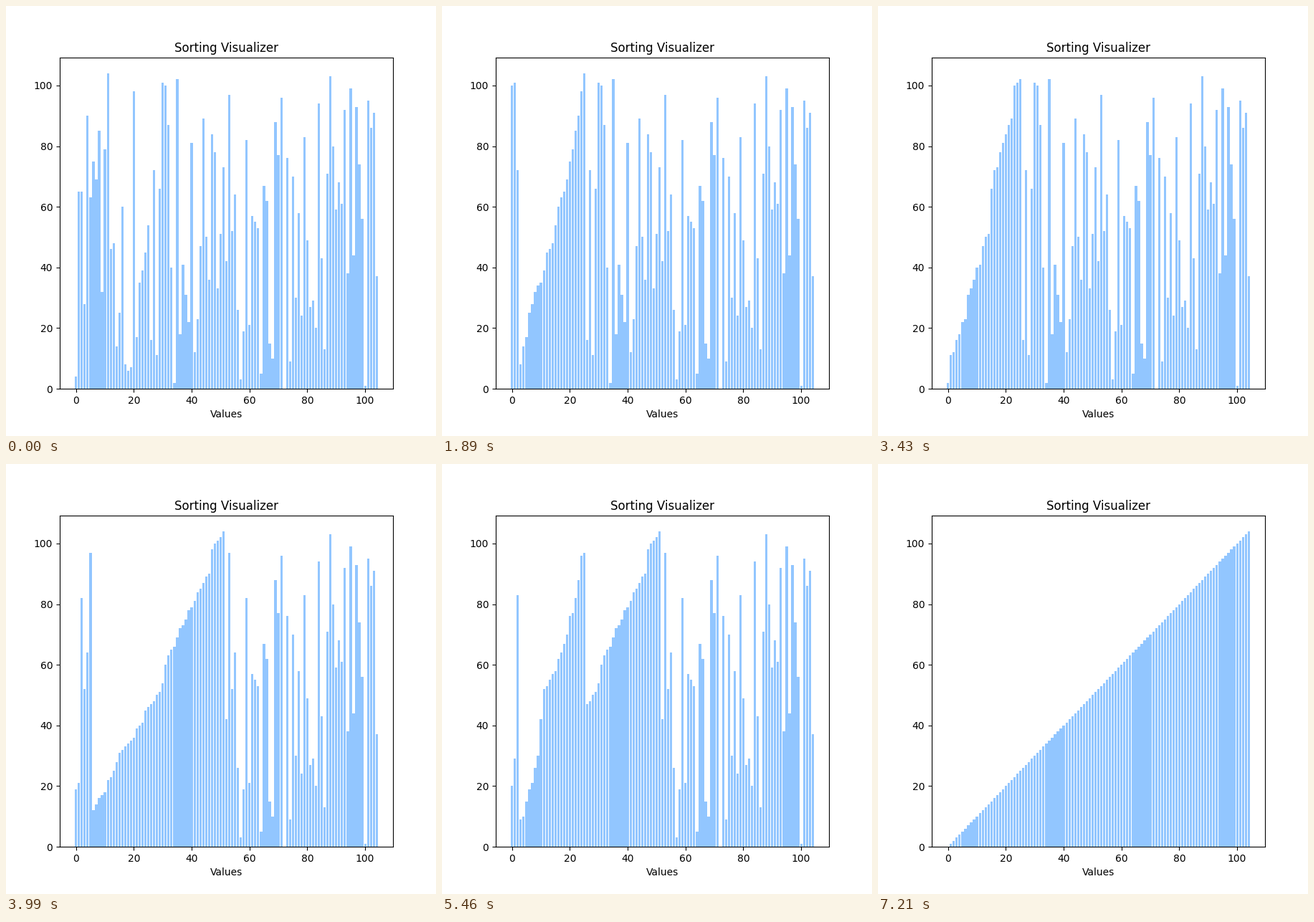
Recreate the animation shown at these times as a matplotlib script. Size 600 by 600 pixels, loop 7.28 s.

```python
import matplotlib.pyplot as plt
from matplotlib.animation import FuncAnimation

VALUES = [
    34, 4, 65, 28, 90, 63, 75, 69, 85, 32, 79, 104, 46, 48, 14,
    25, 60, 8, 6, 7, 98, 17, 35, 39, 45, 54, 16, 72, 11, 66,
    101, 100, 87, 40, 2, 102, 18, 41, 31, 22, 81, 12, 23, 47, 89,
    50, 36, 84, 78, 33, 51, 73, 42, 97, 52, 64, 26, 3, 19, 82,
    21, 57, 55, 53, 5, 67, 62, 15, 10, 88, 77, 96, 0, 76, 9,
    70, 30, 58, 24, 83, 49, 27, 29, 20, 94, 43, 13, 71, 103, 80,
    59, 68, 61, 92, 38, 99, 44, 93, 74, 56, 1, 95, 86, 91, 37,
]
INTERVAL = 70


def merge(left, right):
    out = []
    i = j = 0
    while i < len(left) and j < len(right):
        if left[i] <= right[j]:
            out.append(left[i])
            i += 1
        else:
            out.append(right[j])
            j += 1
    return out + left[i:] + right[j:]


def merge_sort(items):
    """Sort recursively, yielding each merged run."""
    if len(items) < 2:
        return items
    mid = len(items) // 2
    left = yield from merge_sort(items[:mid])
    right = yield from merge_sort(items[mid:])
    merged = merge(left, right)
    yield merged
    return merged


def build_steps(values):
    """Bar heights after every merge; each run is shown from the first bar."""
    shown = list(values)
    steps = []
    for run in merge_sort(values):
        shown[:len(run)] = run
        steps.append(shown.copy())
    return steps


steps = build_steps(VALUES)

fig, ax = plt.subplots(figsize=(6, 6), dpi=100)
bars = ax.bar(range(len(VALUES)), VALUES, color="#92c6ff")
ax.set_title("Sorting Visualizer")
ax.set_xlabel("Values")


def update(step):
    for bar, height in zip(bars, steps[step]):
        bar.set_height(height)
    return bars


anim = FuncAnimation(fig, update, frames=len(steps), interval=INTERVAL,
                     repeat=True, repeat_delay=0)
plt.show()
```
